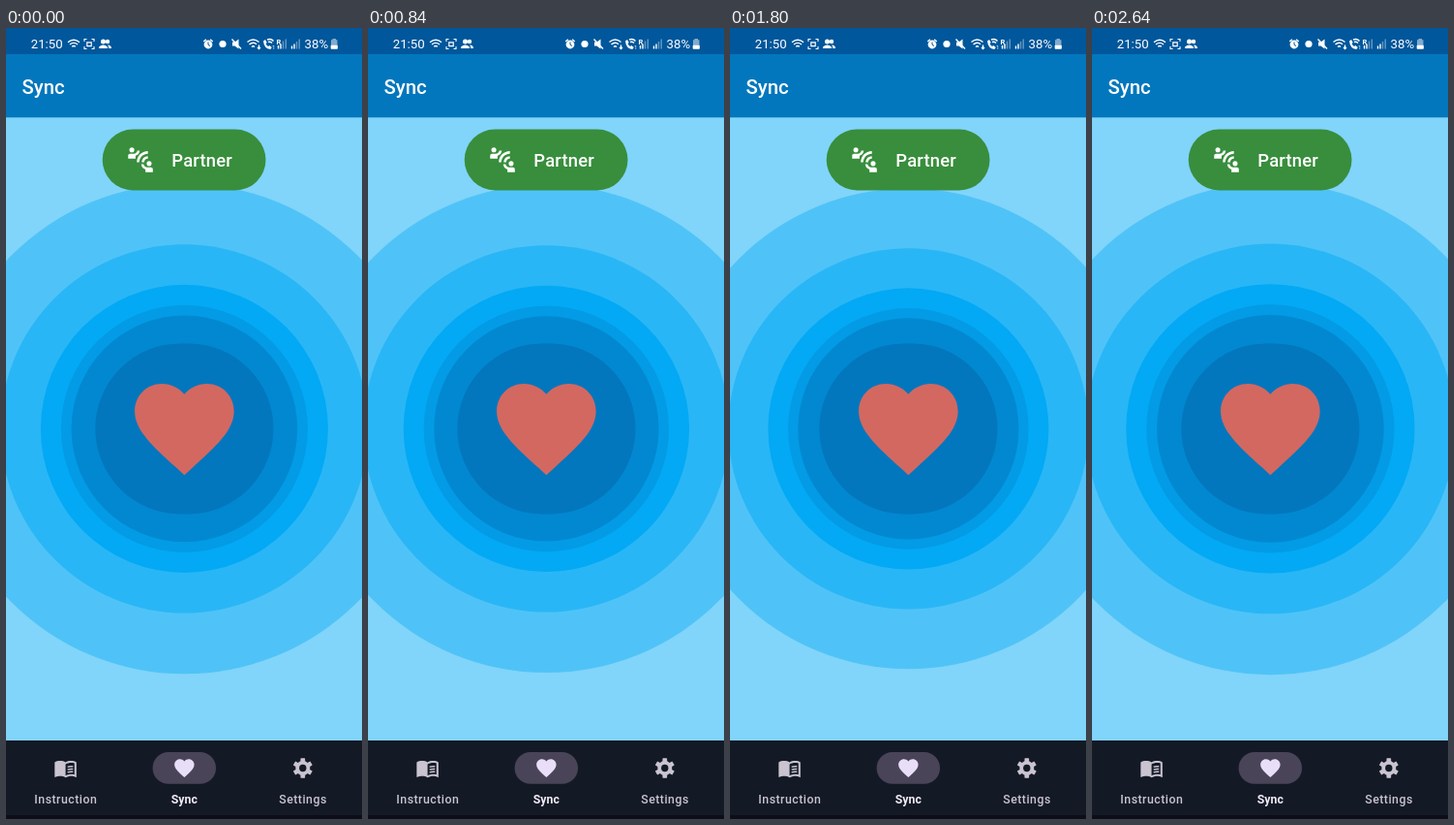
Write an HTML page that moves like this. It is 368x816 px and loops after 2.76 s.

```html
<!DOCTYPE html>
<html lang="en">
<head>
<meta charset="utf-8">
<title>Sync</title>
<style>
  html, body { margin: 0; width: 100%; height: 100%; overflow: hidden; background: #81d4fa; }
  svg { display: block; width: 368px; height: 816px; font-family: Roboto, sans-serif; font-weight: 500; }
  .line { fill: none; stroke: #fff; stroke-width: 1.4; }
  .nav { font-size: 12.3px; letter-spacing: .5px; text-anchor: middle; }
</style>
</head>
<body>
<svg viewBox="0 0 368 816">
  <defs>
    <path id="heart" d="M12 21.35l-1.45-1.32C5.4 15.36 2 12.28 2 8.5 2 5.42 4.42 3 7.5 3c1.74 0 3.41.81 4.5 2.09C13.09 3.81 14.76 3 16.5 3 19.58 3 22 5.42 22 8.5c0 3.78-3.4 6.86-8.55 11.54z"/>
    <rect id="tooth" x="-2.3" y="-10" width="4.6" height="20" rx=".6"/>
    <path id="bars" d="M0 10L9 1V10Z"/>
  </defs>

  <rect width="368" height="816" fill="#81d4fa"/>
  <g id="rings"></g>
  <rect x="92.3" y="325.4" width="184.2" height="176" rx="88" fill="#0277bd"/>
  <use href="#heart" transform="translate(122.8 351.6) scale(5.13)" fill="#d36861"/>

  <!-- partner button -->
  <rect x="99.7" y="104.5" width="168.8" height="63" rx="31.5" fill="#388e3c"/>
  <path transform="translate(123.7 120.7) scale(1.277)" fill="#fff" d="M11 14H9c0-4.97 4.03-9 9-9v2c-3.87 0-7 3.13-7 7zm7-3V9c-2.76 0-5 2.24-5 5h2c0-1.66 1.34-3 3-3zM7 4a2 2 0 1 0-4 0 2 2 0 0 0 4 0zm4.45.5h-2C9.21 5.92 7.99 7 6.5 7h-3C2.67 7 2 7.67 2 8.5V11h6V8.74c1.86-.59 3.25-2.23 3.45-4.24zM19 17a2 2 0 1 0 0-4 2 2 0 0 0 0 4zm1.5 1h-3c-1.49 0-2.71-1.08-2.95-2.5h-2c.2 2.01 1.59 3.65 3.45 4.24V22h6v-2.5c0-.83-.67-1.5-1.5-1.5z"/>
  <text x="171.3" y="143.2" font-size="18.4" letter-spacing=".2" fill="#fff">Partner</text>

  <!-- app bar -->
  <rect width="368" height="92.3" fill="#0277bd"/>
  <rect width="368" height="27" fill="#01579b"/>
  <text x="16.5" y="67.8" font-size="20.4" fill="#fff">Sync</text>

  <!-- status bar -->
  <g fill="#fff" font-size="13.2" font-weight="400">
    <text x="25.8" y="21.3">21:50</text>
    <g class="line">
      <path d="M64 14.8q6-5 12 0M66 17q4-3.3 8 0M68.200 19.200q1.800-1.600 3.600 0"/>
      <path stroke-width="1.1" d="M81 14v-2.500h2.500M88.500 11.500H91V14M91 19v2.500h-2.500M83.500 21.500H81V19"/>
      <path id="capture" stroke-width="1.2" d="M83.800 14.800h4.400v3.800h-4.400z"/>
    </g>
    <circle cx="100.500" cy="14" r="2.500"/><circle cx="105" cy="14" r="2.200"/>
    <path d="M96 21v-1.500q4.500-4 9 0V21zM106 21v-2l-1-1.500q4 .3 4 3.500z"/>
    <circle cx="209" cy="17" r="4.400"/>
    <path class="line" d="M204.300 14l2.500-2.200M213.700 14l-2.500-2.200"/>
    <path d="M209 14.500V17.300l2 1.200" fill="none" stroke="#01579b"/>
    <circle cx="224" cy="16.500" r="3.600"/>
    <path d="M234 14.500h2.500l4-3v10l-4-3H234z"/>
    <path class="line" d="M233.500 11.500l9.500 10"/>
    <path class="line" d="M249.500 14.500q6-5 12 0M251.500 17q4-3.300 7.500-.3M254 19.500q1.500-1.400 3 0M261.500 17.500v4M260 20l1.500 1.500 1.500-1.500"/>
    <path class="line" stroke-width="1.200" d="M270 12q4-1.500 6.500 1.500M271 14.500q2.500-1 4 1"/>
    <path d="M266 13.500l2-1.500 1.700 3-1.200 1.200q1 1.800 2.500 2.700l1.300-1 2.500 2-1.500 2q-6.500-.5-7.300-8.400z"/>
    <text x="275" y="22" font-size="6">1</text>
    <text x="279.500" y="16.500" font-size="7.500" font-weight="700">R</text>
    <path class="line" stroke-width="1.200" d="M281.500 18v3.500M284 16.500v5"/>
    <path class="line" stroke-width="1.200" opacity=".4" d="M286.500 13.500v8M289.300 11.500v10"/>
    <path class="line" stroke-width="1.200" d="M295.500 18.500v3M298 16.500v5"/>
    <path class="line" stroke-width="1.200" opacity=".4" d="M300.500 14v7.500M303.200 11.500v10"/>
    <text x="308.600" y="21.300">38%</text>
    <path opacity=".5" d="M337.500 11h3.500v1.200h1.500v6h-6.500v-6h1.500z"/>
    <rect x="335.700" y="17.800" width="7.200" height="4" rx=".8"/>
  </g>

  <!-- bottom navigation -->
  <rect y="735" width="368" height="81" fill="#131a26"/>
  <rect y="812" width="368" height="4" fill="#0d0c18"/>
  <rect x="151.600" y="747" width="65.400" height="32.800" rx="16.400" fill="#4a4458"/>
  <use href="#heart" transform="translate(172.100 751.200) scale(1.022)" fill="#e8def8"/>
  <g fill="#cac4d0">
    <g transform="translate(49.300 751.400) scale(1.022)">
      <path d="M17.500 4.500c-1.950 0-4.050.4-5.500 1.500-1.450-1.100-3.550-1.500-5.500-1.500S2.450 4.900 1 6v14.650c.1.500.5.500.75.350 1.350-.65 3.300-1 4.750-1 1.950 0 4.050.4 5.500 1.500 1.350-.85 3.800-1.500 5.500-1.500 1.650 0 3.350.3 4.750 1.050.3.100.75-.1.750-.5V6c-1.450-1.100-3.550-1.500-5.500-1.500zM21 18.500c-3-.9-6.500-.3-9 1V8c2.500-1.500 6-1.900 9-1z"/>
      <path d="M14 10.700q2.200-.9 5.500-.5M14 13.400q2.200-.9 5.500-.5M14 16.100q2.200-.9 5.500-.5" fill="none" stroke="#cac4d0" stroke-width="1.500"/>
    </g>
    <g transform="translate(306.800 763.500) scale(1.022)">
      <use href="#tooth"/><use href="#tooth" transform="rotate(60)"/><use href="#tooth" transform="rotate(120)"/>
      <circle r="7.300"/><circle r="3.600" fill="#131a26"/>
    </g>
    <g class="nav">
      <text x="61.800" y="800">Instruction</text>
      <text x="184.300" y="800" font-weight="700" fill="#f0eaf4" letter-spacing="0">Sync</text>
      <text x="307" y="800">Settings</text>
    </g>
  </g>
</svg>
<script>
  const LOOP = 2760, STEP = 120, BEAT = 1440, BEAT_START = 480;
  const BLINK = 840, BLINK_START = 360, BLINK_OFF = 360;
  // resting radius, growth at the peak of the beat, colour
  const rings = [
    [245.2, 8.6, '#4fc3f7'],
    [184, 6.9, '#29b6f6'],
    [143.2, 6, '#03a9f4'],
    [122.6, 5.5, '#039be5'],
    [112.7, 4.6, '#0288d1']
  ].map(([rest, growth, fill]) => {
    const circle = document.createElementNS('http://www.w3.org/2000/svg', 'circle');
    circle.setAttribute('cx', 184.4);
    circle.setAttribute('cy', 413.4);
    circle.setAttribute('fill', fill);
    document.getElementById('rings').append(circle);
    return { circle, rest, growth };
  });
  const capture = document.getElementById('capture');

  function draw(now) {
    const t = Math.floor((now % LOOP) / STEP) * STEP;
    const phase = ((t - BEAT_START + BEAT) % BEAT) / BEAT;
    const swell = 4 * phase * (1 - phase);
    for (const { circle, rest, growth } of rings) circle.setAttribute('r', rest + growth * swell);
    const blink = (t - BLINK_START + BLINK) % BLINK;
    capture.style.visibility = blink < BLINK_OFF ? 'hidden' : 'visible';
  }

  const start = performance.now();
  (function tick() {
    draw(performance.now() - start);
    requestAnimationFrame(tick);
  })();
</script>
</body>
</html>
```
